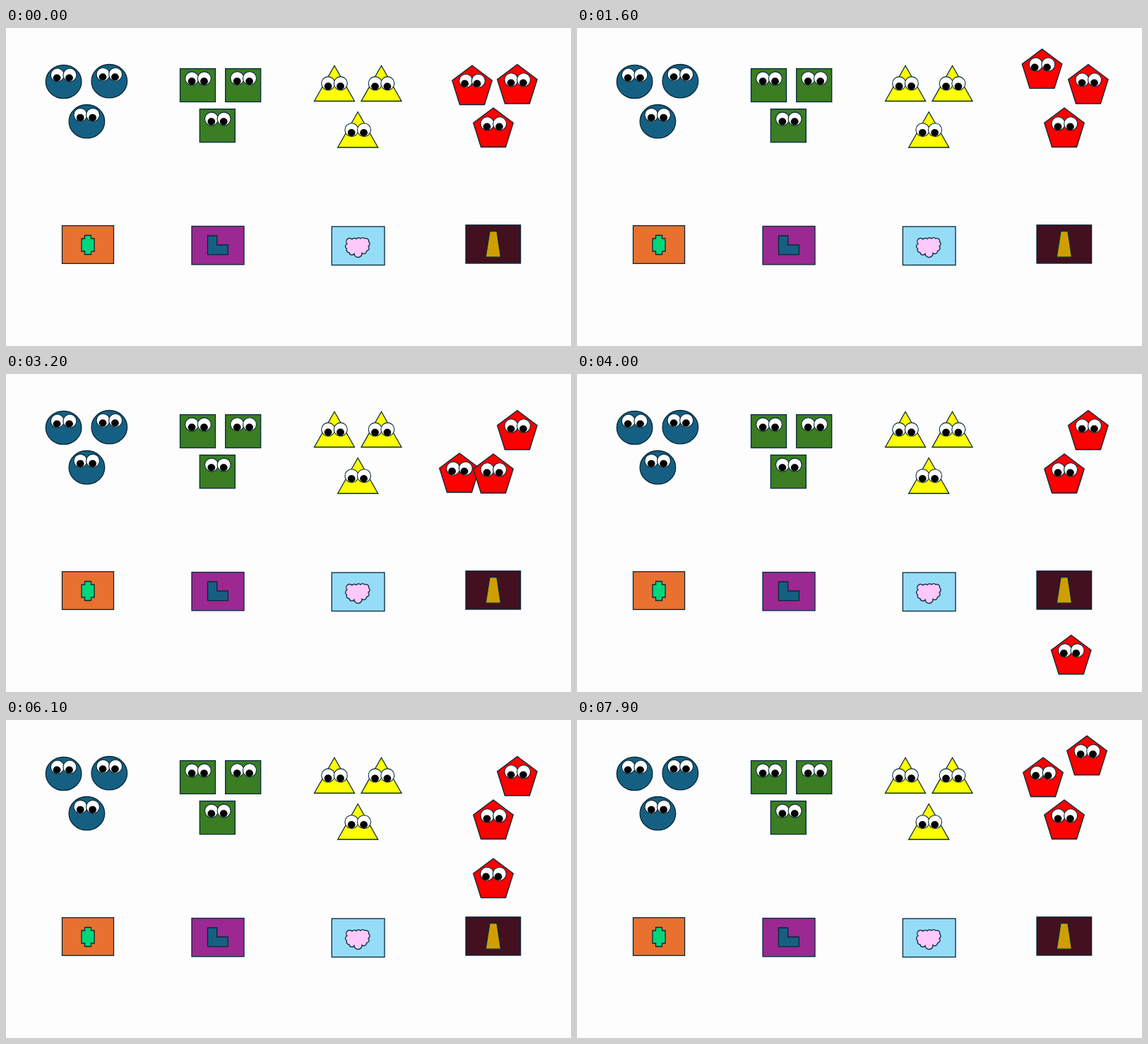
An HTML page for the animation above (8000 ms loop, 800 by 450 pixels).

```html
<!DOCTYPE html>
<html lang="en">
<head>
<meta charset="utf-8">
<title>Shapes and cards</title>
<style>
html, body { margin: 0; width: 100%; height: 100%; overflow: hidden; background: #fdfdfd; }
svg { display: block; width: 800px; height: 450px; }
</style>
</head>
<body>
<svg id="stage" viewBox="0 0 800 450" stroke="#06283a" stroke-width="1.3"></svg>
<script>
const stage = document.getElementById('stage');
const LOOP = 8000, STEP = 100;

function add(parent, tag, attrs) {
  const el = document.createElementNS('http://www.w3.org/2000/svg', tag);
  for (const k in attrs) el.setAttribute(k, attrs[k]);
  return parent.appendChild(el);
}

// Bodies are drawn around their own anchor point.
const bodies = {
  circle: g => add(g, 'ellipse', { rx: 25.3, ry: 23.7, fill: '#156082' }),
  square: g => add(g, 'rect', { x: -25, y: -23.5, width: 50, height: 47, fill: '#3a7d22' }),
  triangle: g => add(g, 'path', { d: 'M0-25L28.5 25.3H-28.5Z', fill: '#ff0' }),
  pentagon: g => add(g, 'path', { d: 'M0-28L28.3-6.8L17.5 27.5H-17.5L-28.3-6.8Z', fill: '#f00' })
};

// ex, ey: middle of the eyes; px, py: pupil shift
function critter(kind, x, y, ex, ey, px, py) {
  const place = add(stage, 'g', { transform: `translate(${x} ${y})` });
  bodies[kind](place);
  for (const side of [-8.8, 8.8])
    add(place, 'circle', { cx: ex + side, cy: ey, r: 9.5, fill: '#fff', 'stroke-width': 1.1 });
  for (const side of [-8.7, 8.7])
    add(place, 'ellipse', { cx: ex + side + px, cy: ey + py, rx: 5.4, ry: 5.1, fill: '#000', stroke: 'none' });
  return place;
}

function card(x, y, w, h, fill, shape, shapeFill) {
  add(stage, 'rect', { x, y, width: w, height: h, fill });
  add(stage, 'path', { d: shape, fill: shapeFill });
}

const puffs = [[483, 305.5], [490, 299], [496, 298.5], [502, 298], [508, 298], [513.5, 302.5],
  [513, 309], [510.5, 315.5], [504, 318.5], [493, 319.5], [486, 318], [482.5, 312.5]];
const cloud = 'M482.5 312.5' + puffs.map(p => `A3.9 3.9 0 0 1 ${p}`).join('') + 'Z';

card(79.5, 279.7, 73, 53.6, '#e8712f',
  'M111.5 293.5h9v4.5h4.5v18h-4.5v4.5h-9v-4.5h-4.5v-18h4.5Z', '#00d67a');
card(263, 280.5, 74, 54.3, '#9c2891', 'M285.5 294H298.7V307H314.3V320.6H285.5Z', '#156082');
card(461.3, 281, 74.7, 54.5, '#95dcf7', cloud, '#fdc8fa');
card(651, 278.8, 77.6, 54.2, '#431020', 'M685 287.5H695L700.5 324.2H679.2Z', '#cf9f00');

critter('circle', 81.6, 76, 0, -9.5, -0.8, 4);
critter('circle', 146.3, 75.2, 0, -9.5, -0.6, 3.6);
critter('circle', 114.4, 132.2, -0.2, -9.3, -0.3, 4);
critter('square', 271.5, 81, 0.5, -9.6, -0.2, 4);
critter('square', 335.7, 81, 0.5, -9.8, -0.3, 4.1);
critter('square', 299.3, 138.2, 0.5, -9.6, -0.3, 3.8);
critter('triangle', 465, 78.2, 0, 0.2, -0.2, 4);
critter('triangle', 531.5, 78.2, 0, 0.2, -0.3, 4.2);
critter('triangle', 498.2, 143.7, 0, 0.5, -0.3, 3.9);

const HOME = [660, 81], REST = [690, 224];
const walker = critter('pentagon', ...HOME, 0, -6.3, -1.7, 4);
const HOME2 = [723.9, 79.5];
const second = critter('pentagon', ...HOME2, 0.3, -6.2, -0.5, 4.2);
critter('pentagon', 690, 141, 0.3, -5.7, -0.6, 4.3);

const clamp = v => Math.max(0, Math.min(1, v));
const part = (t, a, b) => clamp((t - a) / (b - a));
const smooth = v => v * v * (3 - 2 * v);
const mix = (a, b, v) => a.map((n, i) => n + (b[i] - n) * v);
const bend = (a, b, c, v) => mix(mix(a, b, v), mix(b, c, v), v);

// Three hops of 900 ms with a slight lean to the left
function hop([x, y], t) {
  if (t <= 0 || t >= 2700) return [x, y];
  const lift = 36 * Math.sin(Math.PI * (t % 900) / 900);
  return [x - 0.065 * lift, y - lift];
}

function walk(t) {
  const bank = [642, 140], left = [603, 311], top = [684, 222];
  if (t < 2700) return hop(HOME, t);
  if (t < 3200) return mix(HOME, bank, part(t, 2700, 3200) ** 1.6);
  if (t < 3620) return bend(bank, [608, 205], left, part(t, 3200, 3620));
  if (t < 4700) {
    // around the card: left, below, right, above
    const a = Math.PI - part(t, 3620, 4700) * 274 * Math.PI / 180;
    return [690 + 87 * Math.cos(a), 311 + 87 * Math.sin(a)];
  }
  if (t < 6250) return mix(top, REST, smooth(part(t, 4700, 5100)));
  return mix(REST, HOME, smooth(part(t, 6250, 7200)));
}

const move = (el, [x, y]) => el.setAttribute('transform', `translate(${x.toFixed(2)} ${y.toFixed(2)})`);

const start = performance.now();
function draw() {
  const now = (performance.now() - start) % LOOP;
  const t = Math.floor(now / STEP) * STEP;
  move(walker, walk(t));
  move(second, hop(HOME2, t - 7630));
  requestAnimationFrame(draw);
}
draw();
</script>
</body>
</html>
```
